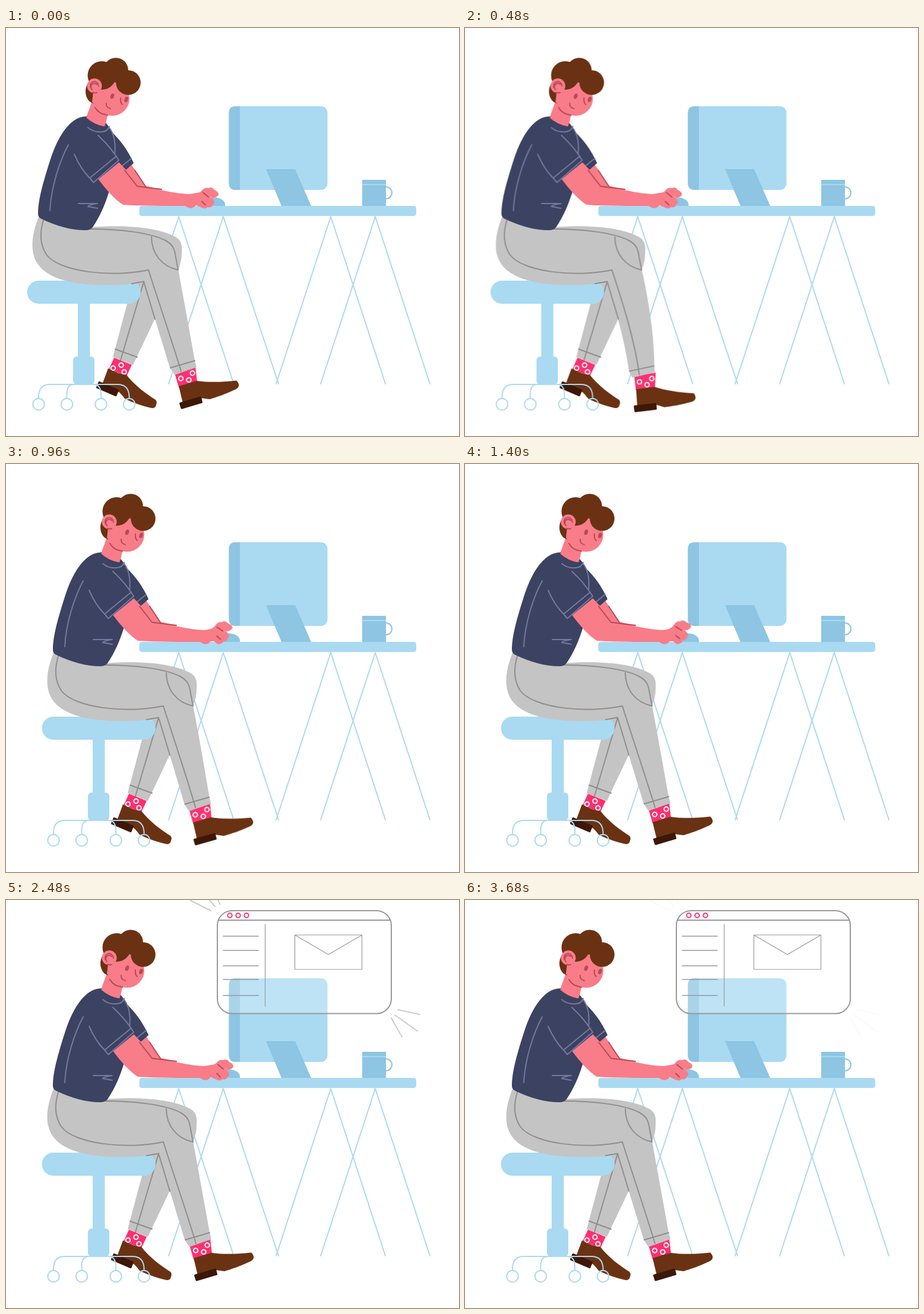
Animation, 763 px wide and 688 px high, one loop 3.96 s. Source, as an HTML page:

```html
<!DOCTYPE html>
<html lang="en">
<head>
<meta charset="utf-8">
<title>At the desk</title>
<style>
  :root {
    --sky: #a9daf2; --sea: #8dc5e2; --navy: #3c4262; --stitch: #747a9c;
    --skin: #f97c89; --blush: #b54b58; --hair: #6a3213; --sole: #3d1708;
    --sock: #ff3070; --cloth: #c4c4c4; --seam: #8e8e8e; --ink: #999;
  }
  html, body { margin: 0; width: 100%; height: 100%; overflow: hidden; background: #fff; }
  svg { display: block; width: 763px; height: 688px; }

  .sky { fill: var(--sky); }
  .sea { fill: var(--sea); }
  .navy { fill: var(--navy); }
  .skin { fill: var(--skin); }
  .hair { fill: var(--hair); }
  .sole { fill: var(--sole); stroke: var(--sole); stroke-width: 3; stroke-linejoin: round; }
  .sock { fill: var(--sock); }
  .cloth { fill: var(--cloth); }
  .blush { fill: var(--blush); }
  .line { fill: none; stroke-width: 2; stroke-linecap: round; stroke-linejoin: round; }
  .l-sky { stroke: var(--sky); }
  .l-sea { stroke: var(--sea); }
  .l-stitch { stroke: var(--stitch); }
  .l-blush { stroke: var(--blush); }
  .l-seam { stroke: var(--seam); }
  .l-ink { stroke: var(--ink); }
  .l-sock { stroke: var(--sock); }
  .l-ray { stroke: #ccc; }
  .l-white { stroke: #fff; }

  /* sine ease between keyframes unless a keyframe says otherwise */
  .sitter, .shin, .crease, .foot, .fingers, .window, .rays {
    animation: 3960ms cubic-bezier(.37, 0, .63, 1) infinite;
  }

  .sitter { animation-name: roll; }
  @keyframes roll {
    0%, 6.06% { transform: translateX(0); }
    22.58%, 100% { transform: translateX(25px); }
  }

  .foot { animation-name: push; transform-origin: 303px 590px; }
  @keyframes push {
    0%, 6.06% { transform: translate(0, 0) rotate(0deg); }
    14.65% { transform: translate(-10px, 9px) rotate(12deg); animation-timing-function: cubic-bezier(.32, .1, .3, 1); }
    28.28%, 100% { transform: translate(0, 0) rotate(0deg); }
  }

  .shin { animation-name: bend; }
  @keyframes bend {
    0%, 6.06% {
      d: path("M232 426 L251 491 C260 520 268 547 276 573 L284 585 L321 572 L318 561 C309 510 299 456 290 406 L262 380 Z");
    }
    14.65% {
      d: path("M232 426 L250 491 C258 520 264 552 267 580 L272 591 L310 583 L310 571 C312 525 303 460 290 406 L262 380 Z");
      animation-timing-function: cubic-bezier(.32, .1, .3, 1);
    }
    28.28%, 100% {
      d: path("M232 426 L251 491 C260 520 268 547 276 573 L284 585 L321 572 L318 561 C309 510 299 456 290 406 L262 380 Z");
    }
  }

  .crease { animation-name: fold; }
  @keyframes fold {
    0%, 6.06% { d: path("M240 408 C258 465 277 520 295 579 M277 573 L318 561"); }
    14.65% {
      d: path("M240 408 C260 468 279 530 284 586 M268 580 L309 572");
      animation-timing-function: cubic-bezier(.32, .1, .3, 1);
    }
    28.28%, 100% { d: path("M240 408 C258 465 277 520 295 579 M277 573 L318 561"); }
  }

  .fingers { animation-name: click; transform-origin: 308px 292px; }
  @keyframes click {
    0%, 20.2%, 40.4%, 60.6%, 100% { transform: rotate(0deg); }
    30.3%, 50.5% { transform: rotate(-17deg); }
  }

  .window { animation-name: show; animation-timing-function: linear; }
  @keyframes show {
    0%, 42.4% { opacity: 0; }
    59.6%, 100% { opacity: 1; }
  }

  .rays { animation-name: flash; }
  @keyframes flash {
    0%, 62.6% { opacity: 0; }
    62.62% { opacity: 1; }
    92.9%, 100% { opacity: .1; }
  }
</style>
</head>
<body>
<svg viewBox="0 0 763 688">
  <!-- desk -->
  <path class="line l-sky" d="M199 600 L291 318 L383.500 600 M274 600 L366 318 L459 600 M455 600 L547 318 L639 600 M530 600 L622 318 L714 600"/>
  <rect class="sky" x="224.500" y="300" width="466.500" height="17" rx="4.500"/>
  <rect class="sky" x="375.500" y="132" width="166" height="141" rx="11"/>
  <path class="sea" d="M394 132 H386.500 Q375.500 132 375.500 143 V262 Q375.500 273 386.500 273 H394 Z"/>
  <path class="sea" d="M438 238 H487 L514 300 H464 Z"/>
  <rect class="sea" x="600" y="256" width="40" height="44"/>
  <path class="line l-sky" d="M600 264 H640" style="stroke-linecap:butt"/>
  <path class="line l-sea" d="M640 268 A10 10 0 0 1 640 288"/>

  <!-- pop-up mail window -->
  <g class="window">
    <rect x="356" y="18" width="293" height="173.500" rx="25" fill="#fff" fill-opacity=".25"/>
    <rect class="line l-ink" x="356" y="18" width="293" height="173.500" rx="25"/>
    <path class="line l-ink" d="M358 34 H647"/>
    <g class="line l-sock">
      <circle cx="377" cy="26" r="3.700"/>
      <circle cx="391" cy="26" r="3.700"/>
      <circle cx="405" cy="26" r="3.700"/>
    </g>
    <path class="line l-ink" style="stroke-width:1.500" d="M366 61 H425 M366 85 H425 M366 111 H425 M366 134 H425 M366 161 H425"/>
    <path class="line l-ink" style="stroke-width:1.200" d="M436.500 41 V179 M486.500 59 H599.500 V117 H486.500 Z L543 92 L599.500 59"/>
  </g>
  <path class="rays line l-ray" d="M311 1 L345 18 M341 -2 L352 11 M357 -1 L360 7 M660 185 L697 193 M655 194 L693 221 M649 199 L667 231"/>

  <g class="sitter">
    <!-- far leg -->
    <path class="cloth" d="M212 428 L240 420 L251 490 L214 568 L180 555 L204 465 Z"/>
    <path class="line l-seam" d="M232 428 L193 560 M184 541.500 L221 555"/>
    <path class="sock" d="M182 556 L212 568 L203 587 L173 576 Z"/>
    <g class="line l-white">
      <circle cx="180.500" cy="573.500" r="3.700"/>
      <circle cx="194" cy="568.500" r="3.700"/>
      <circle cx="199" cy="580" r="3.700"/>
    </g>
    <path class="hair" d="M172 574 Q189 584 203 585 C216 602 236 617 252 627 Q255 630 253 635 Q252 641 246 641 C232 638 213 632 200 625 Q192 614 187 612 L162 601 Z"/>
    <path class="sole" d="M157 597.500 L188.500 611 L185 619.500 L153.500 606 Z"/>

    <!-- chair -->
    <rect class="sky" x="35.500" y="426" width="191.500" height="39" rx="19.500"/>
    <rect class="sky" x="121" y="460" width="20.500" height="98"/>
    <rect class="sky" x="113" y="554" width="36" height="47" rx="6"/>
    <path class="line l-sky" d="M55 624 V620 Q56 601 74 601 H188 Q206 601 207.500 620 V624 M102.500 624 V616 Q103 602 113 601 M160 624 V616 Q159 602 149 601"/>
    <g class="line l-sky">
      <circle cx="55" cy="634.500" r="9.700"/>
      <circle cx="102.500" cy="634.500" r="9.700"/>
      <circle cx="160" cy="634.500" r="9.700"/>
      <circle cx="207.500" cy="634.500" r="9.700"/>
    </g>

    <!-- near leg -->
    <g class="foot">
      <path class="sock" d="M284 582 L319 571 L322 597 L291 606 Z"/>
      <g class="line l-white">
        <circle cx="294.500" cy="591" r="3.700"/>
        <circle cx="308" cy="593.500" r="3.700"/>
        <circle cx="314" cy="582" r="3.700"/>
      </g>
      <path class="hair" d="M291 604 L321 595 C342 598 366 597 388 594.500 Q393 599 392 604 Q391 608 383 611 C368 618 356 622 343 626 L328 624 L298 633 Z"/>
      <path class="sole" d="M293.500 633 L327.500 623 L329.500 631 L296 641 Z"/>
    </g>
    <path class="shin cloth" d="M232 426 L251 491 C260 520 268 547 276 573 L284 585 L321 572 L318 561 C309 510 299 456 290 406 L262 380 Z"/>
    <path class="cloth" d="M56 316 C47 338 43 357 45 375 C50 416 95 433 168 433.500 C195 433.500 215 432 233 428 L290 408 C294 398 296 390 296 380 C297 367 296 358 285 352 C257 337 205 331 140 336 Z"/>
    <path class="crease line l-seam" d="M240 408 C258 465 277 520 295 579 M277 573 L318 561"/>
    <path class="line l-seam" d="M64 321 C56 345 57 365 68 382 C90 412 180 421 240 408 M142 339 C190 339 243 345 268 358 C281 365 284 372 286 387 L290 408 M245 352 C245 380 262 402 290 408 M212 431 L232 427.500 L251 491"/>

    <!-- mouse -->
    <path class="sea" d="M338 300 V288 C350 282 368 287 369 297 V300 Z"/>

    <!-- far arm -->
    <path class="skin" d="M196 235 L211 230 L235 266 L262 273 L222 270 Z"/>
    <path class="line l-blush" d="M217 240 L235 267"/>
    <path class="navy" d="M176 174 C190 185 206 207 215 228 L201 240 L180 216 Z"/>
    <path class="line l-stitch" d="M195 233 L211 220"/>

    <!-- neck -->
    <path class="skin" d="M147 118 L135 151 L141 166 H167 L172 143 Z"/>

    <!-- shirt -->
    <path class="navy" d="M137 149 C105 148 85 190 74 224 C62 262 54 290 54 314 Q54 319 60 322 C85 334 110 341 134 341 Q142 341 146 336 C158 318 166 300 173 278 L192 222 C188 200 184 184 178 176 Q174 166 168 160 L166 166 Q148 163 135 151 Z"/>
    <path class="line l-stitch" d="M105 197 C90 225 76 268 74 308 M138 168 C150 178 171 178 174 166 M174 168 C183 180 185 196 183 214 M122 296 H154 Q140 298 138 301 L154 304"/>

    <!-- near arm -->
    <path class="skin" d="M154 253 L188 224 L203 240 L221 266 C250 270 285 280 310 280 L327 277 L338 290 L341 300 Q333 308 326 299 L320 299 Q312 308 302 300 C270 300 228 300 197 298 C184 290 168 272 154 253 Z"/>
    <path class="line l-blush" d="M200 240 L221 267 L262 272"/>
    <path class="navy" d="M120 222 Q130 243 148 261 L191 226 L189 220 L160 190 Z"/>
    <path class="line l-stitch" d="M115 213 C122 229 130 242 141 253 L147.500 260.500 L190 223 C182 210 168 193 155 181 M141 253 L186 216"/>
    <g class="fingers">
      <path class="skin" d="M316 281 Q325 279 329 275 Q335 268 341 270 Q347 267 351 273 Q358 276 358 281 Q355 287 347 286 L343 283 Q349 288 351 293 Q351 297 348 298 Q346 304 340 302 Q336 306 330 303 L318 298 Z"/>
      <path class="line l-blush" d="M332 277.500 L341 285 M330 292.500 L336 298.500"/>
    </g>

    <!-- head -->
    <ellipse class="hair" cx="149" cy="107" rx="15" ry="20"/>
    <circle class="skin" cx="179" cy="119" r="29"/>
    <path class="skin" d="M148 98 H176 V146 L145 125 Z"/>
    <g class="hair">
      <circle cx="161.500" cy="80" r="24"/>
      <circle cx="185" cy="71" r="20.800"/>
      <circle cx="206" cy="92" r="20.800"/>
    </g>
    <circle class="skin" cx="149" cy="97.500" r="12.500"/>
    <path class="line l-blush" d="M142 100 C140 88 155 87 156 98 M145 104 C140 97 147 90 153 95 M146 108.500 Q150 110 153 109 M150 134 Q156 145 171 147 M169 127 Q168 134 176 136 M193 118 Q192 126 196 129"/>
    <ellipse class="blush" cx="179" cy="115" rx="3" ry="4.700" transform="rotate(20 179 115)"/>
    <ellipse class="blush" cx="202.500" cy="120.500" rx="3" ry="4.700" transform="rotate(20 202.500 120.500)"/>
  </g>
</svg>
</body>
</html>
```
